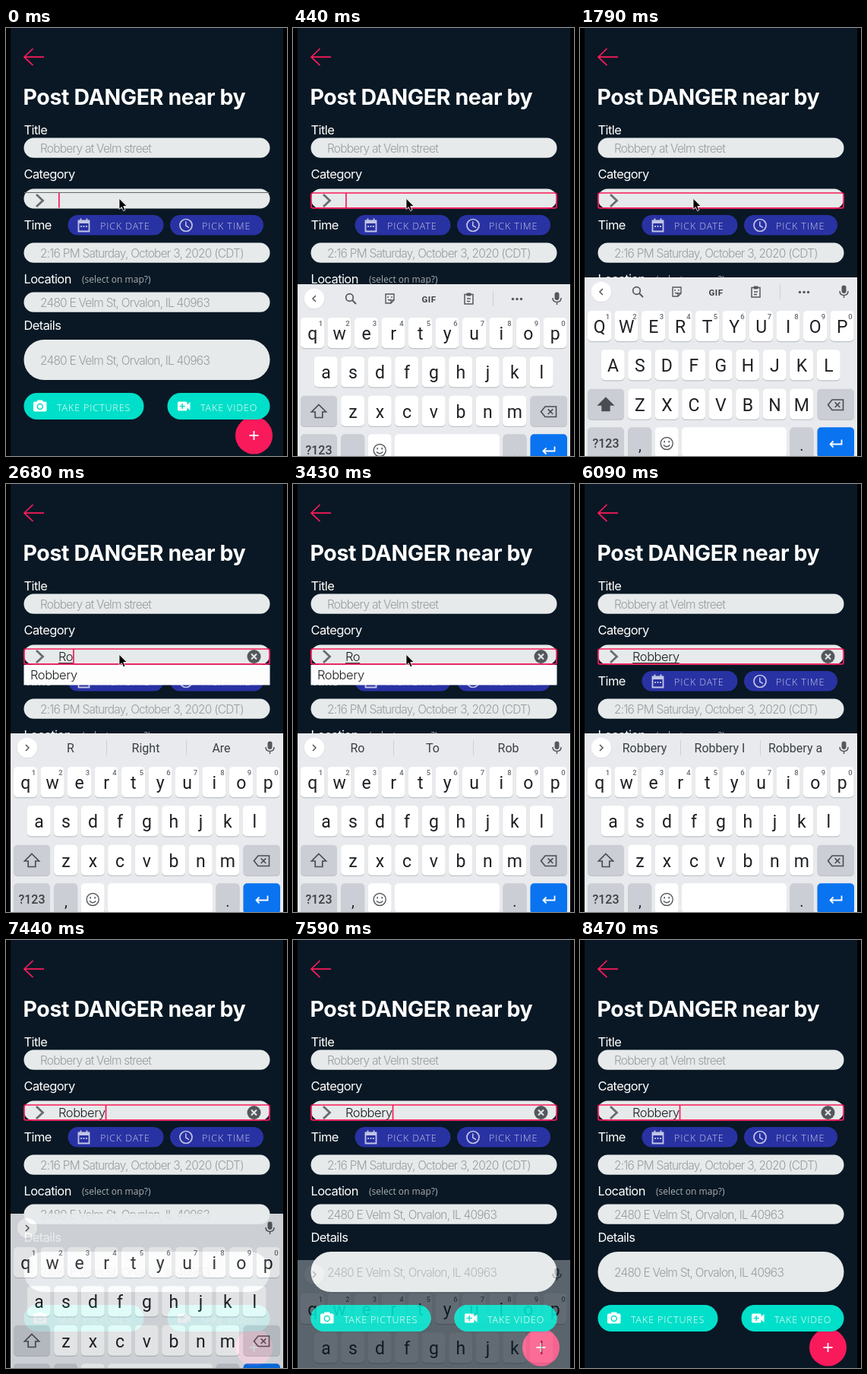
Animation, 370 px wide and 563 px high, one loop 8.63 s. Source, as an HTML page:

```html
<!DOCTYPE html>
<html lang="en">
<head>
<meta charset="utf-8">
<title>Post form</title>
<style>
html, body { margin: 0; width: 100%; height: 100%; overflow: hidden; background: #000; }
svg { display: block; width: 370px; height: 563px; }
text { white-space: pre; }
.head { font: 700 28.5px Inter, sans-serif; letter-spacing: -.37px; fill: #fff; }
.label { font: 400 16.5px Inter, sans-serif; letter-spacing: -.6px; fill: #fff; }
.hint { font: 300 15.5px Inter, sans-serif; letter-spacing: -.79px; fill: #999c9e; }
.value { font: 300 16.5px Inter, sans-serif; letter-spacing: -.45px; fill: #1c1e20; }
.note { font: 400 12px "Open Sans", sans-serif; fill: #a9afb5; }
.btn { font: 300 12.5px "Open Sans", sans-serif; letter-spacing: .9px; }
.key { font: 400 23px Roboto, sans-serif; fill: #1f2023; text-anchor: middle; }
.num { font: 500 9.5px Roboto, sans-serif; fill: #666a6e; text-anchor: middle; }
.word { font: 400 16px Roboto, sans-serif; fill: #3c4043; text-anchor: middle; }
.line { fill: none; stroke-width: 1.7; }
</style>
</head>
<body>
<svg id="stage" viewBox="0 0 370 563"></svg>
<script>
const LOOP = 8630;
const RED = '#f91a5b', FIELD = '#e7eaea', INK = '#54585c';

const text = (cls, x, y, s, extra = '') => `<text class="${cls}" x="${x}" y="${y}" ${extra}>${s}</text>`;
const box = (x, y, w, h, r, fill, extra = '') =>
  `<rect x="${x}" y="${y}" width="${w}" height="${h}" rx="${r}" fill="${fill}" ${extra}/>`;
const line = (d, color, width = 1.7) =>
  `<path class="line" d="${d}" stroke="${color}" style="stroke-width:${width}"/>`;
const group = (id, body) => `<g id="${id}">${body}</g>`;

function form() {
  const address = '2480 E Velm St, Orvalon, IL 40963';
  const labels = [['Title', 140], ['Category', 198], ['Time', 265], ['Location', 336], ['Details', 397]];
  const fields = [
    [144.6, 26.2, 'Robbery at Velm street', 164],
    [282.6, 26.2, '2:16 PM Saturday, October 3, 2020 (CDT)', 302],
    [347.6, 26.2, address, 367],
    [410, 53, address, 442.5]
  ];
  const pale = '#c3c6e4';
  return box(6, 0, 359, 563, 0, '#091824')
    + line('M24 38.2H50M35.5 27.2L24 38.2L35.5 49.2', RED)
    + text('head', 22.5, 100.5, 'Post DANGER near by')
    + labels.map(([s, y]) => text('label', 23.5, y, s)).join('')
    + text('note', 100, 335, '(select on map?)')
    + fields.map(([y, h, s, base]) =>
        box(23.5, y, 324, h, h / 2, FIELD) + text('hint', 45, base, s)).join('')
    + box(81.5, 246, 126, 26.5, 13.2, '#2932a3')
    + box(216, 246, 123, 26.5, 13.2, '#2932a3')
    + text('btn', 124, 264.5, 'PICK DATE', `fill="${pale}"`)
    + text('btn', 258, 264.5, 'PICK TIME', `fill="${pale}"`)
    + line('M95.5 253.5H109.5V267.5H95.5Z', pale, 1.8) + box(95, 253, 15, 4, 0, pale)
    + line('M98.5 250.5V254M106.5 250.5V254', pale, 1.8)
    + line('M98.2 261H100M101.6 261H103.4M105 261H106.8', pale, 1.8)
    + `<circle class="line" cx="237" cy="259.5" r="8" stroke="${pale}"/>`
    + line('M236.8 254.5V260L241 262.6', pale, 1.5);
}

function category() {
  return box(23.5, 211.5, 324, 26, 13, FIELD)
    + line('M40 219L48.5 227L40 235', '#696c6f', 2.8)
    + group('idle', line('M24 216.5H347', '#67696b', 1))
    + group('focus', box(24, 217, 323, 19.8, 2, 'none', `stroke="${RED}" stroke-width="1.7"`))
    + text('value', 69, 233, '', 'id="typed"')
    + box(69, 235, 0, 1, 0, '#333', 'id="underline"')
    + box(69, 217, 1.7, 19.5, 0, RED, 'id="caret"')
    + group('clear', `<circle cx="326.5" cy="227" r="9" fill="${INK}"/>` + line('M323 223.5L330 230.5M330 223.5L323 230.5', FIELD, 2))
    + group('menu', box(23.5, 238, 324, 26.5, 0, '#fdfdfd') + text('value', 32, 257, 'Robbery'));
}

function actions() {
  const teal = '#00dfc9';
  return box(23.5, 480, 158, 35, 17.5, teal) + box(212.5, 480, 135, 35, 17.5, teal)
    + text('btn', 67, 504, 'TAKE PICTURES', 'fill="#fff"')
    + text('btn', 256, 504, 'TAKE VIDEO', 'fill="#fff"')
    + box(36, 491.5, 17.5, 13, 1.8, '#fff') + box(41, 489.5, 7.5, 4, 1, '#fff')
    + `<circle cx="44.8" cy="498" r="3.5" fill="#fff" stroke="${teal}" stroke-width="1.5"/>`
    + box(226, 491.5, 12.5, 12, 1.5, '#fff') + '<path d="M238 496L242.5 492V503L238 499Z" fill="#fff"/>'
    + line('M232.2 494V501M228.7 497.5H235.7', teal, 1.5);
}

function keyboard() {
  const PITCH = 35.5, GREY = '#cbced4';
  const cap = (x, y, w, fill = '#fff') => box(x, y + 1.2, w, 40, 5, '#bfc2c7') + box(x, y, w, 40, 5, fill);
  const row = (letters, x0, y) => [...letters].map((c, i) => {
    const x = x0 + i * PITCH;
    return cap(x, y, 31) + text('key letter', x + 15.7, y + 29, c);
  }).join('');
  const digits = [...'1234567890'].map((d, i) => text('num', 36.5 + i * PITCH, 383, d)).join('');
  const tools =
      '<circle class="line" cx="74.5" cy="345.5" r="4.8" stroke="#54585c"/>' + line('M78 349L83 354', INK, 2)
    + line('M122 341H133V349L129 353H122ZM129 353V349H133M125 344V346M130 344V346M125 348Q127 350 129 348', INK, 1.4)
    + text('word', 179, 351.5, 'GIF', 'style="font-weight:700;font-size:11.5px;letter-spacing:.5px"')
    + line('M226 341.5H237V354H226ZM229 347H234M229 350.5H233', INK, 1.5) + box(228.5, 339.5, 6, 4, 1, INK)
    + line('M263.5 337.5V357', '#cdd0d3', 1)
    + [289.5, 295, 300.5].map(x => `<circle cx="${x}" cy="347.5" r="1.7" fill="${INK}"/>`).join('')
    + line('M30 343L26 347L30 351', INK, 1.5);
  const words = line('M132.5 337V357M237.5 337V357', '#cdd0d3', 1)
    + [85, 184, 283.5].map(x => text('word pick', x, 353, '')).join('');
  return box(6, 328, 359, 420, 0, '#e8eaed')
    + '<circle cx="28" cy="347.5" r="13.5" fill="#c9ccd0"/><circle cx="28" cy="347" r="13.3" fill="#fff"/>'
    + group('tools', tools) + group('words', words)
    + group('more', line('M26 343L30 347L26 351', INK, 1.5))
    + box(344.5, 338.5, 6, 10.5, 3, INK) + line('M342 346Q342 351.5 347.5 351.5T353 346M347.5 351.5V355', INK, 1.5)
    + row('qwertyuiop', 10, 372) + digits
    + row('asdfghjkl', 27.7, 423.3)
    + cap(10, 474.7, 48, GREY) + row('zxcvbnm', 63.2, 474.7) + cap(312.5, 474.7, 48.5, GREY)
    + '<path id="shift" class="line" d="M34 486.5L43.5 496H38.8V503.5H29.2V496H24.5Z" stroke="#4a4d51"/>'
    + line('M332 489H346.5V502.5H332L326.5 495.7ZM335.7 492.4L342.3 499M342.3 492.4L335.7 499', '#4a4d51', 1.6)
    + cap(10, 525.3, 48, GREY) + cap(63.2, 525.3, 31, GREY) + cap(98.7, 525.3, 31)
    + cap(134, 525.3, 138) + cap(276.5, 525.3, 31, GREY) + cap(312.5, 525.3, 48.5, '#0a73f0')
    + text('word', 34, 552, '?123', 'style="font-weight:500"')
    + text('key', 79, 556, ',', 'style="font-size:20px"') + text('key', 292, 556, '.', 'style="font-size:20px"')
    + `<circle class="line" cx="114.2" cy="546.5" r="8" style="stroke-width:1.4" stroke="${INK}"/>`
    + line('M111.2 543V545.5M117.2 543V545.5M110 548.5Q114.2 553 118.4 548.5', INK, 1.5)
    + line('M344.5 541.5V547.5H329.5M333.5 543.5L329.5 547.5L333.5 551.5', '#fff', 1.8);
}

const stage = document.getElementById('stage');
stage.innerHTML = form() + category()
  + `<circle cx="326.5" cy="536" r="24.5" fill="${RED}"/>` + line('M320.5 536H332.5M326.5 530V542', '#fff', 1.8)
  + group('actions', actions()) + group('keyboard', keyboard())
  + '<use id="actionsFade" href="#actions" opacity=".75"/>'
  + '<path id="pointer" d="M0 0V14.2L3.3 11.2L5.6 16.3L8 15.2L5.7 10.2H10.2Z" fill="#000" stroke="#fff" stroke-width=".8"/>';

// Each row lists only what changes at that time.
const steps = [
  [0, { typed: '', caret: 1, focus: 0, menu: 0, clear: 0, under: 0, upper: 0, words: null,
        drop: 0, alpha: 0, closing: 0, pointer: [149, 224.3] }],
  [140, { focus: 1, drop: 92, alpha: .4 }],
  [290, { drop: 32, alpha: .9 }],
  [440, { drop: 9, alpha: 1 }],
  [590, { drop: 0 }],
  [1190, { caret: 0 }],
  [1640, { upper: 1 }],
  [1930, { typed: 'R', under: 1, caret: 1, clear: 1, upper: 0 }],
  [2080, { words: ['R', 'Right', 'Are'], menu: 1 }],
  [2680, { typed: 'Ro' }],
  [2980, { words: ['Ro', 'To', 'Rob'] }],
  [3430, { caret: 0 }],
  [3720, { pointer: [138, 233] }],
  [3870, { pointer: [112, 245], caret: 1 }],
  [4020, { pointer: [88, 250] }],
  [4310, { typed: 'Robbery', menu: 0 }],
  [4610, { words: ['Robbery', 'Robbery I', 'Robbery a'] }],
  [4760, { pointer: [90, 262] }],
  [4910, { pointer: [104, 300], caret: 0 }],
  [5060, { pointer: [130, 358] }],
  [5200, { pointer: [160, 425] }],
  [5350, { pointer: [186, 485], caret: 1 }],
  [5500, { pointer: [208, 532] }],
  [5650, { pointer: [220, 559] }],
  [5800, { pointer: null }],
  [6090, { caret: 0 }],
  [6540, { caret: 1 }],
  [7140, { caret: 0 }],
  [7440, { caret: 1, under: 0, words: [], drop: 32, alpha: .88 }],
  [7590, { drop: 93, alpha: .36, closing: 1 }],
  [7740, { alpha: 0, closing: 0 }],
  [8040, { caret: 0 }],
  [8470, { caret: 1 }]
];

const $ = id => document.getElementById(id);
const show = (id, on) => { $(id).style.display = on ? '' : 'none'; };
const letters = [...stage.querySelectorAll('.letter')].map(el => [el, el.textContent]);
const picks = [...stage.querySelectorAll('.pick')];

function paint(s) {
  $('typed').textContent = s.typed;
  const width = s.typed ? $('typed').getComputedTextLength() : 0;
  $('underline').setAttribute('width', s.under ? width : 0);
  $('caret').setAttribute('x', 69 + width);
  for (const id of ['caret', 'focus', 'menu', 'clear']) show(id, s[id]);
  show('idle', !s.focus);
  show('tools', !s.words);
  show('more', s.words);
  show('words', s.words && s.words.length);
  picks.forEach((el, i) => { el.textContent = s.words && s.words[i] || ''; });
  letters.forEach(([el, c]) => { el.textContent = s.upper ? c.toUpperCase() : c; });
  $('shift').style.fill = s.upper ? '#4a4d51' : 'none';
  show('keyboard', s.alpha);
  $('keyboard').setAttribute('opacity', s.alpha);
  $('keyboard').setAttribute('transform', `translate(0 ${s.drop})`);
  show('actionsFade', s.closing);
  show('pointer', s.pointer);
  if (s.pointer) $('pointer').setAttribute('transform', `translate(${s.pointer})`);
}

let shown = -1;
function tick() {
  const t = performance.now() % LOOP;
  const count = steps.filter(([at]) => at <= t).length;
  if (count !== shown) {
    shown = count;
    paint(Object.assign({}, ...steps.slice(0, count).map(step => step[1])));
  }
  requestAnimationFrame(tick);
}
tick();
</script>
</body>
</html>
```
